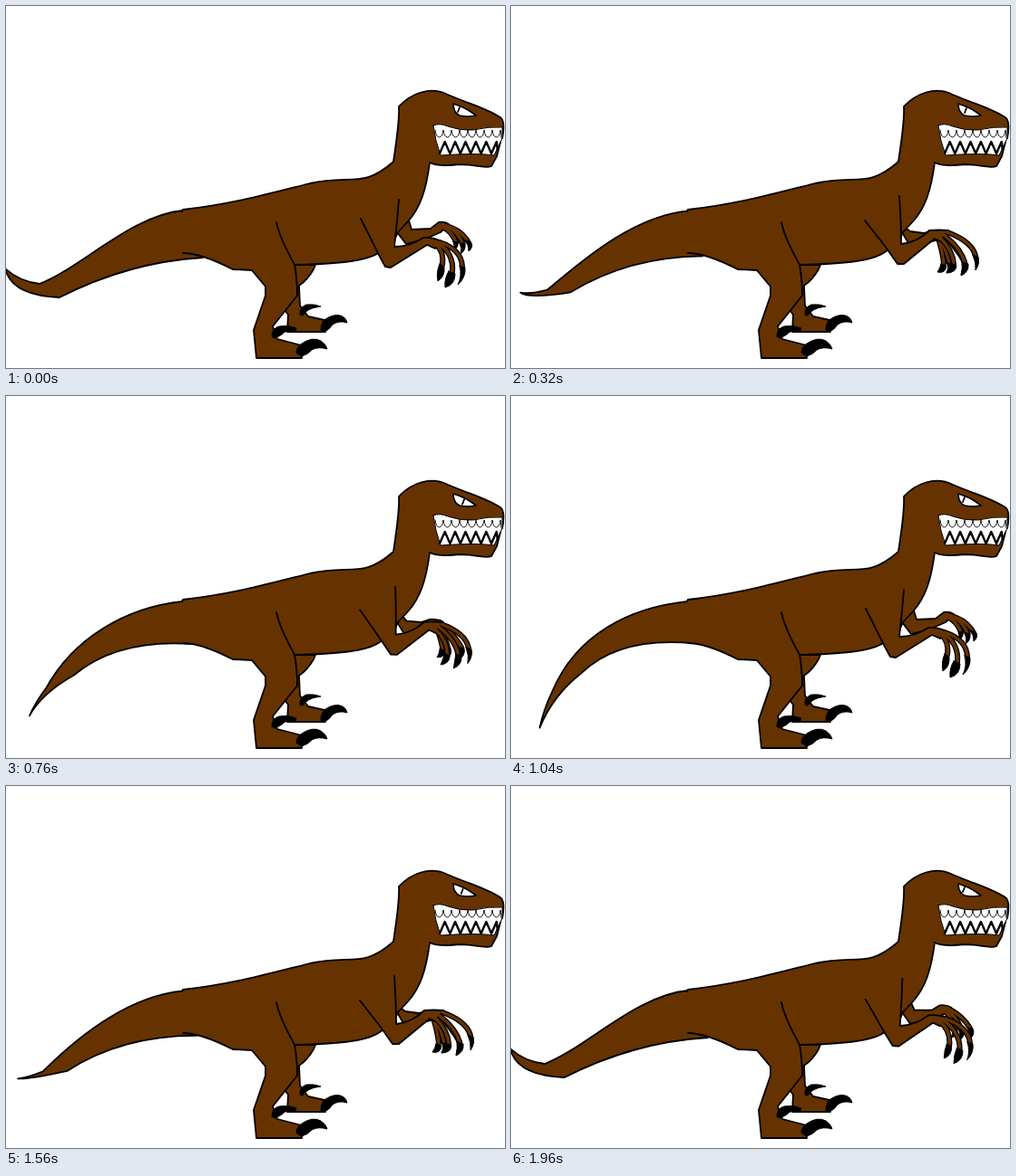
An HTML page that plays this animation: 550x400 px, repeating every 2 s.

```html
<!DOCTYPE html>
<html lang="en">
<head>
<meta charset="utf-8">
<title>Dinosaur</title>
<style>
  html, body { margin: 0; width: 100%; height: 100%; overflow: hidden; background: #fff; }
  svg { display: block; }
  path { fill: none; stroke: #000; stroke-width: 1.8; stroke-linejoin: round; stroke-linecap: round; }
  .skin { fill: #630; }
  .flat { fill: #630; stroke: none; }
  .claw { fill: #000; stroke-width: 1; }
  .white { fill: #fff; }
  .edge { stroke-width: 6; }
  .flesh { stroke: #630; stroke-width: 3.4; }
</style>
</head>
<body>
<svg width="550" height="400" viewBox="0 0 550 400">
  <path id="tail" class="skin"/>

  <!-- far arm -->
  <path id="farEdge" class="edge"/>
  <path id="farArm" class="skin"/>
  <path id="farFlesh" class="flesh"/>
  <path id="farClaws" class="claw"/>

  <!-- far leg -->
  <path class="skin" d="M318 286H341L339 291Q332 303 323 309L324 331 333 343 351 347 352 360H310L311 341 307 336 321 320Z"/>
  <path class="claw" d="M324 341Q323 333 331 330 340 329 347 332 338 333 333 336L327 342Z"/>
  <path class="claw" d="M347 358Q347 350 352 346 363 339 371 343 375 345 376 350 367 347 360 352 356 358 351 360Z"/>

  <!-- body and near leg -->
  <path class="flat" d="M195 225C250 219 295 206 335 196 381 186 393 202 427 172L467 173C463 205 456 223 444 237L432 250 428 259Q418 268 412 272C397 283 360 285 318 286L321 320 294 354 299 368 326 375V389H276L273 358 286 320V310L271 292 250 291Q215 273 195 273Z"/>
  <path d="M194 227L195 225C250 219 295 206 335 196 381 186 393 202 427 172M467 173C463 205 456 223 444 237L432 250 428 259Q418 268 412 272C397 283 360 285 318 286"/>
  <path d="M195 273Q215 273 250 291L271 292 286 310V320L273 358 276 389H326V386M298 239C302 259 314 277 318 286Q321 301 321 320L294 354 299 368 326 375"/>
  <path class="claw" d="M293 365Q293 356 301 354 311 352 320 356L319 359Q309 357 304 363L297 367Z"/>
  <path class="claw" d="M320 383Q320 377 326 373 338 365 347 370 353 374 354 379 344 376 337 380 333 385 326 387Z"/>

  <!-- head -->
  <path class="flat" d="M427 172C430 150 434 128 433 111 446 97 467 88 487 98 510 108 533 114 546 124 549 128 549 136 547 146L541 166 535 177C528 180 515 175 500 175 485 177 475 177 467 173L460 190H420Z"/>
  <path d="M427 172C430 150 434 128 433 111 446 97 467 88 487 98 510 108 533 114 546 124 549 128 549 136 547 146M545 150L541 166 535 177C528 180 515 175 500 175 485 177 475 177 467 173"/>
  <path class="white" style="stroke-width:1" d="M471 132Q478 129 487 133 500 138 515 137 532 133 547 134L547 146 544 152 538 165Q520 162 479 165 473 149 471 132Z"/>
  <path id="upper" style="stroke-width:.9"/>
  <path id="lower" style="stroke-width:2.4"/>
  <path class="white" style="stroke-width:1.7" d="M493 108Q507 112 518 121 509 123 500 121 493 118 493 108Z"/>
  <path id="pupil"/>

  <!-- near arm -->
  <path id="nearEdge" class="edge"/>
  <path id="nearArm" class="skin"/>
  <path id="nearFlesh" class="flesh"/>
  <path id="nearClaws" class="claw"/>
</svg>
<script>
const FRAME = 40, FRAMES = 50;

// Each shape: its two extreme poses, with matching commands.
const poses = {
  tail: [
    'M195 226C138 231 82 290 37 307Q14 304 -1 290Q6 320 59 322Q135 283 217 278',
    'M195 227C130 234 72 262 46 327Q37 348 33 370Q48 331 79 305Q119 265 200 273'],
  farArm: [
    'M444 237L447 247L468 246L477 239Q483 238 488 241L479 250L463 257L441 263L431 250',
    'M436 246L440 249L455 251L464 249Q474 249 480 252L472 258L455 262L438 262L431 250'],
  farFingers: [
    'M480 244Q491 248 496 261M482 242Q498 248 503 262M485 243Q501 247 509 260',
    'M470 254Q475 268 477 284M472 254Q480 270 483 284M476 252Q492 268 500 283'],
  farClaws: [
    'M493 260L498 261Q499 267 493 270Q495 265 493 260ZM500 262L506 262Q507 270 501 274Q503 268 500 262ZM507 259L512 260Q516 266 510 271Q510 265 507 259Z',
    'M474 285L480 287Q479 296 470 294Q473 290 474 285ZM481 284L486 285Q487 293 480 295Q483 290 481 284ZM497 283L503 284Q504 293 496 297Q498 290 497 283Z'],
  nearArm: [
    'M391 235L412 277L418 288L424 289L464 264L473 268L478 259Q468 255 460 256Q445 266 428 266Q431 240 433 214',
    'M390 237L412 265L426 285L433 285L467 257L473 260L482 248Q471 247 461 248Q448 261 430 263Q430 240 428 210'],
  nearFingers: [
    'M473 263Q483 270 481 286M475 261Q494 273 492 294M478 261Q502 269 503 288',
    'M473 256Q487 270 488 285M477 253Q496 268 500 283M481 250Q508 260 512 276'],
  nearClaws: [
    'M478 285L483 288Q484 299 476 304Q474 294 478 285ZM488 293L495 296Q495 308 484 311Q483 301 488 293ZM500 287L506 289Q507 300 498 308Q503 298 500 287Z',
    'M485 284L491 287Q490 295 480 295Q484 290 485 284ZM498 283L504 285Q505 294 496 298Q498 290 498 283ZM509 275L515 277Q517 285 512 292Q513 284 509 275Z']
};

const numbers = /-?[\d.]+/g;
const draw = (id, d) => document.getElementById(id).setAttribute('d', d);

function blend(name, t) {
  const [from, to] = poses[name], ends = to.match(numbers);
  let i = 0;
  return from.replace(numbers, n => +n + (ends[i++] - n) * t);
}

// Piecewise linear curve through [x, y] knots.
function ramp(x, knots) {
  const i = Math.max(1, knots.findIndex(k => k[0] >= x));
  const [x0, y0] = knots[i - 1], [x1, y1] = knots[i];
  return y0 + (y1 - y0) * (x - x0) / (x1 - x0);
}

function render(frame) {
  const phase = frame % 26;
  const reach = ramp(phase, [[0, 0], [8, 1], [17, 1], [26, 0]]);
  const look = ramp(phase, [[0, 0], [8, 2], [17, 5], [19, 5], [23, 0], [26, 0]]);

  draw('tail', blend('tail', Math.min(frame, FRAMES - 1 - frame) / 24));
  for (const side of ['far', 'near']) {
    const fingers = blend(side + 'Fingers', reach);
    draw(side + 'Edge', fingers);
    draw(side + 'Flesh', fingers);
    draw(side + 'Arm', blend(side + 'Arm', reach));
    draw(side + 'Claws', blend(side + 'Claws', reach));
  }
  draw('pupil', `M${500 + look} ${112 + look / 2}l-2 5`);
}

draw('upper', 'M473 137' + 'q1 8 4.5 8t4.5 -8'.repeat(8) + 'l1 9');
draw('lower', 'M478 163' + 'l5.7 -13l5.7 13'.repeat(5) + 'l5.7 -13l1 8');

function tick(now) {
  render(Math.floor(now / FRAME) % FRAMES);
  requestAnimationFrame(tick);
}
render(0);
requestAnimationFrame(tick);
</script>
</body>
</html>
```
